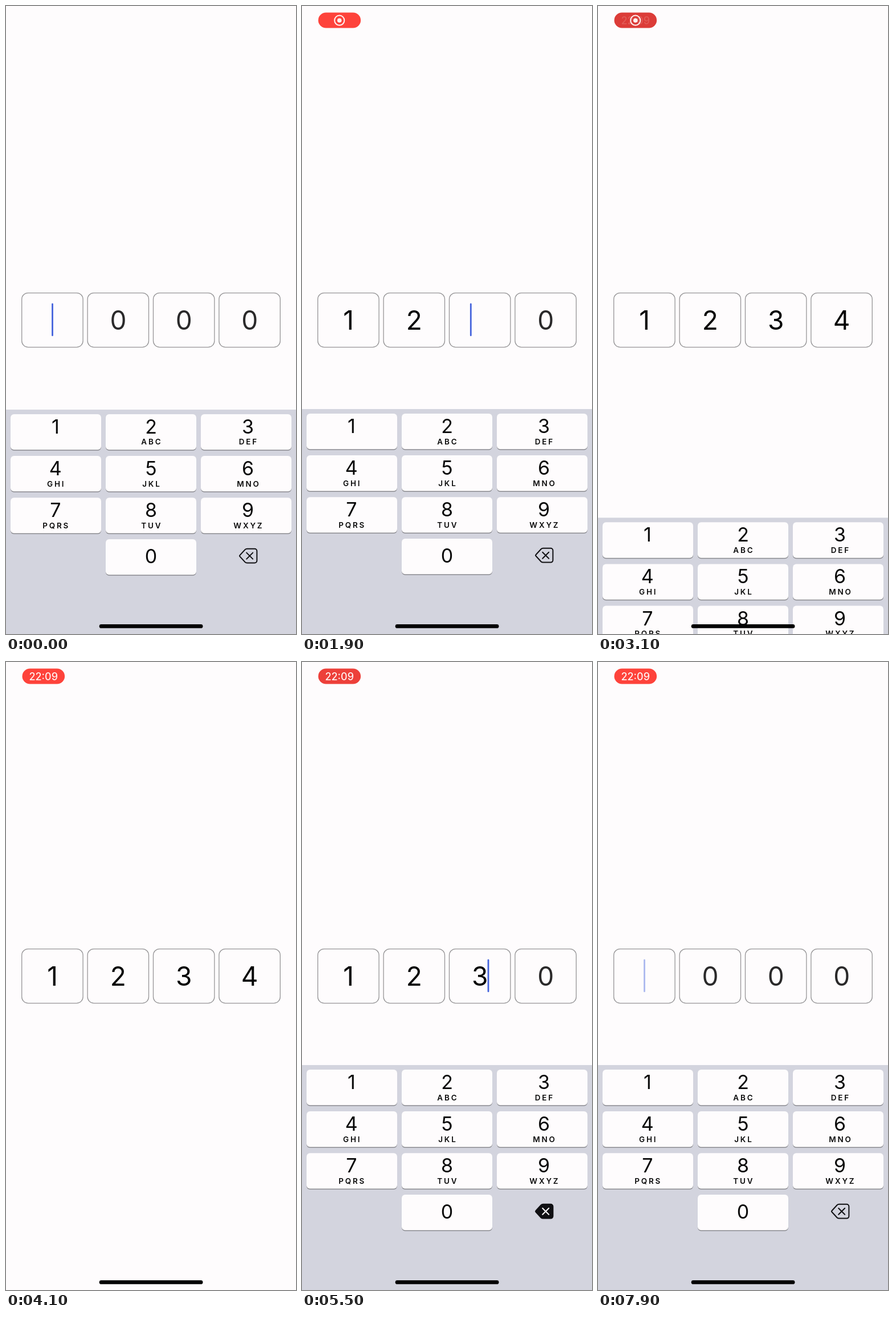
Animation of 509x1100 px, one loop 8000 ms. Source, as an HTML page with a canvas:

```html
<!DOCTYPE html>
<html lang="en">
<head>
<meta charset="utf-8">
<title>Code entry</title>
<style>
  html, body { margin: 0; width: 100%; height: 100%; overflow: hidden; background: #fefcfd; }
  canvas { display: block; width: 509px; height: 1100px; }
</style>
</head>
<body>
<canvas id="stage"></canvas>
<script>
const W = 509, H = 1100, LOOP = 8000;
const canvas = document.getElementById('stage');
const ctx = canvas.getContext('2d');
const ratio = window.devicePixelRatio || 1;
canvas.width = W * ratio;
canvas.height = H * ratio;
ctx.scale(ratio, ratio);

const FONT = 'Inter, "Liberation Sans", sans-serif';
const PAPER = '#fefcfd';
const TYPED = [1250, 1860, 2350, 2850];
const ERASED = [5500, 5780, 6060, 6340];
const HOLD = 100;
const BLUR = 3012, REFOCUS = 4420;
const BOARD_TOP = 706, BOARD_H = H - BOARD_TOP;
const LETTERS = ['', 'ABC', 'DEF', 'GHI', 'JKL', 'MNO', 'PQRS', 'TUV', 'WXYZ'];
const KEY_X = [8, 175, 342], LABEL_X = [86.8, 254.5, 424.5];

const clamp = v => Math.max(0, Math.min(1, v));
const passed = (times, t) => times.filter(at => t >= at).length;

// Critically damped spring: share of the distance still left after ms.
function springLeft(ms) {
  const x = Math.max(0, ms) / 1000 * Math.sqrt(1000 / 3);
  return (1 + x) * Math.exp(-x);
}

function roundRect(x, y, w, h, r) {
  ctx.beginPath();
  ctx.roundRect(x, y, w, h, r);
}

function fillRound(x, y, w, h, r, color) {
  ctx.fillStyle = color;
  roundRect(x, y, w, h, r);
  ctx.fill();
}

function label(str, x, y, size, weight, color, spacing = 0) {
  ctx.font = `${weight} ${size}px ${FONT}`;
  ctx.letterSpacing = spacing + 'px';
  ctx.textAlign = 'center';
  ctx.fillStyle = color;
  ctx.fillText(str, x + spacing / 2, y);
  ctx.letterSpacing = '0px';
}

function caretAlpha(since) {
  const phase = since % 1000 / 1000;
  return phase < 0.8 ? 1 - clamp((phase - 0.45) / 0.2) : (phase - 0.8) / 0.2;
}

function drawBoxes(t) {
  const erased = passed(ERASED, t);
  const count = passed(TYPED, t) - erased;
  const editing = t >= REFOCUS;
  const focused = editing || t < BLUR;
  const active = editing ? Math.max(0, count - 1) : Math.min(3, count);

  for (let i = 0; i < 4; i++) {
    const x = 27.7 + i * 115.4, mid = x + 53.8;
    roundRect(x, 502.6, 107.4, 95, 11);
    ctx.strokeStyle = '#969597';
    ctx.lineWidth = 1.3;
    ctx.stroke();

    const filled = i < count;
    const here = focused && i === active;
    if (filled) label(i + 1, mid, 567, 46, 400, '#050505');
    else if (!here) label('0', mid, 567, 46, 400, '#2a292a');
    if (!here) continue;

    let offset = 0;
    if (filled) offset = ctx.measureText(i + 1).width / 2 + 0.5;
    else if (!editing && i > 0) offset = -16;
    const moves = [-450, ...TYPED, REFOCUS, ...ERASED].filter(at => at <= t);
    ctx.globalAlpha = caretAlpha(t - moves[moves.length - 1]);
    fillRound(mid + offset - 1.4, 520.7, 2.8, 57.6, 1.2, '#4463dc');
    ctx.globalAlpha = 1;
  }
}

function drawKey(col, y, pressed) {
  fillRound(KEY_X[col], y + 1.5, 159, 62.3, 6, '#89898e');
  fillRound(KEY_X[col], y, 159, 62.3, 6, pressed ? '#b9bcc7' : PAPER);
}

function drawErase(x, y, pressed) {
  ctx.beginPath();
  ctx.moveTo(x - 14.8, y + 1);
  ctx.quadraticCurveTo(x - 15.8, y, x - 14.8, y - 1);
  ctx.lineTo(x - 5.6, y - 11);
  ctx.quadraticCurveTo(x - 4.2, y - 12.4, x - 2, y - 12.4);
  ctx.arcTo(x + 15.2, y - 12.4, x + 15.2, y, 4);
  ctx.arcTo(x + 15.2, y + 12.4, x, y + 12.4, 4);
  ctx.lineTo(x - 2, y + 12.4);
  ctx.quadraticCurveTo(x - 4.2, y + 12.4, x - 5.6, y + 11);
  ctx.closePath();
  ctx.lineWidth = 2;
  ctx.lineCap = ctx.lineJoin = 'round';
  ctx.strokeStyle = ctx.fillStyle = '#101013';
  if (pressed) ctx.fill();
  ctx.stroke();
  ctx.beginPath();
  for (const s of [-1, 1]) {
    ctx.moveTo(x + 2.5 - 5.5, y - 5.5 * s);
    ctx.lineTo(x + 2.5 + 5.5, y + 5.5 * s);
  }
  if (pressed) ctx.strokeStyle = PAPER;
  ctx.stroke();
}

function drawKeyboard(t) {
  let left = springLeft(t + 450);
  if (t >= REFOCUS) left = springLeft(t - REFOCUS);
  else if (t >= BLUR) left = 1 - springLeft(t - BLUR);
  const top = BOARD_TOP + BOARD_H * left;
  if (top > H - 0.5) return;

  ctx.fillStyle = '#d3d4de';
  ctx.fillRect(0, top, W, BOARD_H + 2);
  LETTERS.forEach((letters, i) => {
    const col = i % 3, y = top + 8 + Math.floor(i / 3) * 73.1;
    const pressed = i < 4 && t >= TYPED[i] - HOLD && t < TYPED[i];
    drawKey(col, y, pressed);
    label(i + 1, LABEL_X[col], y + 34, 34, 400, '#080808');
    if (letters) label(letters, LABEL_X[col], y + 53.5, 13.5, 600, '#080808', 2.8);
  });
  drawKey(1, top + 227, false);
  label('0', LABEL_X[1], top + 269, 34, 400, '#080808');
  drawErase(425.2, top + 256.2, ERASED.some(at => t >= at && t < at + HOLD));
}

function drawStatus(t) {
  const shown = clamp((t - 100) / 300);
  if (!shown) return;
  const glow = (1 + Math.cos(t / 1000 * Math.PI)) / 2;
  const mix = (a, b) => Math.round(a + (b - a) * glow);
  ctx.globalAlpha = shown;
  fillRound(28.5, 11.5, 74.6, 27, 13.5, `rgb(${mix(219, 255)},${mix(60, 67)},${mix(56, 59)})`);

  ctx.globalAlpha = shown * (1 - clamp((t - 3120) / 250));
  ctx.strokeStyle = ctx.fillStyle = '#fff3f2';
  ctx.lineWidth = 2;
  ctx.beginPath();
  ctx.arc(65.7, 25.2, 8.6, 0, Math.PI * 2);
  ctx.stroke();
  ctx.beginPath();
  ctx.arc(65.7, 25.2, 3.8, 0, Math.PI * 2);
  ctx.fill();

  ctx.globalAlpha = clamp((t - 3050) / 300);
  label('22:09', 65.7, 31.7, 18, 500, '#fff1f0');
  ctx.globalAlpha = 1;
}

function draw() {
  const t = performance.now() % LOOP;
  ctx.fillStyle = PAPER;
  ctx.fillRect(0, 0, W, H);
  drawStatus(t);
  drawBoxes(t);
  drawKeyboard(t);
  fillRound(163.7, 1083, 181.8, 6.8, 3.4, '#030303');
  requestAnimationFrame(draw);
}
draw();
</script>
</body>
</html>
```
